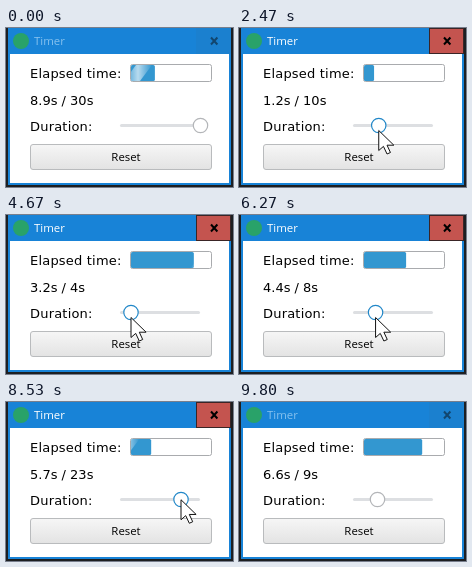
Animation of 227 by 159 pixels, one loop 9.87 s. Source, as an HTML page:

```html
<!DOCTYPE html>
<html lang="en">
<head>
<meta charset="utf-8">
<title>Timer</title>
<style>
  html, body { margin: 0; width: 100%; height: 100%; overflow: hidden; background: #1d1f22; }
  svg { display: block; width: 227px; height: 159px; }
  .label { font: 13px "DejaVu Sans", Verdana, sans-serif; }
  .wide { letter-spacing: .2px; }
  .ui { font: 11.4px "Open Sans", "Noto Sans", sans-serif; }
</style>
</head>
<body>
<svg viewBox="0 0 227 159">
  <defs>
    <linearGradient id="face" x2="0" y2="1">
      <stop stop-color="#f6f6f6"/><stop offset="1" stop-color="#e3e3e3"/>
    </linearGradient>
    <linearGradient id="glow">
      <stop stop-color="#fff" stop-opacity="0"/>
      <stop offset=".5" stop-color="#fff" stop-opacity=".65"/>
      <stop offset="1" stop-color="#fff" stop-opacity="0"/>
    </linearGradient>
    <clipPath id="filled"><rect id="clip" x="125" y="37" height="16" rx="1.5"/></clipPath>
  </defs>

  <rect x="2" width="223" height="157" fill="#1883d7"/>
  <rect x="4" y="26" width="219" height="129" fill="#fff"/>
  <circle cx="15" cy="13" r="8" fill="#29a269"/>
  <text id="title" class="ui" x="28" y="17">Timer</text>
  <rect id="close" x="190.5" y=".5" width="34" height="25"/>
  <path id="cross" d="M205 9.5l6.4 7m0-7l-6.4 7" stroke-width="2" fill="none"/>

  <text class="label wide" x="24" y="50">Elapsed time:</text>
  <text id="status" class="label" x="24" y="77"></text>
  <text class="label wide" x="24" y="103">Duration:</text>

  <rect x="124.5" y="36.5" width="81" height="17" rx="2" fill="#fff" stroke="#a9abae"/>
  <g clip-path="url(#filled)">
    <rect x="125" y="37" width="80" height="16" fill="#3397d0"/>
    <path id="sheen" d="M-9 53L3 37H19L7 53Z" fill="url(#glow)"/>
  </g>

  <rect x="114" y="96" width="80" height="3" rx="1.5" fill="#dddfe2"/>
  <circle id="knob" cy="97.5" r="7.2" fill="#fff" stroke-width="1.2"/>

  <rect id="button" x="24.5" y="116.5" width="181" height="25" rx="2.5"/>
  <text class="ui" x="120" y="133" text-anchor="middle" textLength="">Reset</text>

  <path id="cursor" d="M.5 .5V20.5L5.2 16.4L8.8 24L12.2 22.5L8.8 15.2H15.6Z"
        fill="#fff" stroke="#111" stroke-linejoin="round"/>
</svg>
<script>
const LOOP = 9870, FPS = 15;
const DRAG_START = 1500, DRAG_END = 9200;
const $ = id => document.getElementById(id);
const set = (id, attrs) => {
  for (const key in attrs) $(id).setAttribute(key, attrs[key]);
};

// start and end time of each pointer move, and where it leads
const moves = [
  [130, 700, 182, 128], [1070, 1330, 190, 102], [DRAG_START, 2900, 124.5, 102],
  [6000, 6530, 147, 102], [6900, 7530, 143, 101], [7530, 8200, 187, 97],
  [8200, DRAG_END, 138, 98], [9250, 9600, 152, 164]
];

function pointer(t) {
  let x = 215, y = 164;
  for (const [from, to, tx, ty] of moves) {
    const p = Math.min(1, Math.max(0, (t - from) / (to - from)));
    const ease = p * p * (3 - 2 * p);
    x += (tx - x) * ease;
    y += (ty - y) * ease;
  }
  return { x, y };
}

// two ticks of a tenth in every 200 ms
const ticks = ms => (2 * Math.floor(ms / 200) + (ms % 200 >= 60)) / 10;

// dragging slows the clock; it rests once the duration is reached
function elapsed(t) {
  if (t < 870) return 8.9 + t * .0008;
  if (t < 3070) return (t - 770) * .00072;
  if (t < 6070) return 1.6 + ticks(Math.min(t, 5530) - 3070);
  if (t < 6930) return 4.2 + ticks(t - 6070);
  const s = (t - 6930) / 1000;
  return 5.1 + .28 * s + .09 * s * s;
}

function draw(t) {
  const active = t >= 870 && t < 9700;
  const dragging = t >= DRAG_START && t < DRAG_END;
  const { x, y } = pointer(t);
  const knob = t < DRAG_START ? 194.5 : pointer(Math.min(t, DRAG_END)).x + .5;
  const total = (knob - 114) * 30 / 81;
  const time = Math.floor(elapsed(t) * 10 + 1e-6) / 10;

  set("title", { fill: active ? "#fff" : "#86c1ee" });
  set("close", {
    fill: active ? "#c4544f" : "#1b80cf",
    stroke: active ? "#3a2526" : "#1b80cf"
  });
  set("cross", { stroke: active ? "#000" : "#12466f" });

  $("status").textContent = `${time.toFixed(1)}s / ${Math.round(total)}s`;
  set("clip", { width: 80 * Math.min(1, time / total) });
  set("sheen", { transform: `translate(${109 + (t + 100) % 2150 * .18} 0)` });

  set("knob", { cx: knob, stroke: dragging ? "#2187c8" : "#b3b5b8" });
  const focused = t >= 730 && t < DRAG_START;
  set("button", { fill: "url(#face)", stroke: focused ? "#3a92cc" : "#b9bbbd" });
  set("cursor", {
    visibility: t >= 130 && t < 9600 ? "visible" : "hidden",
    transform: `translate(${x} ${y})`
  });
}

const origin = performance.now();
function frame() {
  const t = Math.max(0, performance.now() - origin) % LOOP;
  const step = Math.floor((t + 4) * FPS / 1000) % 148;
  draw(Math.round(step * 100 / FPS) * 10);
  requestAnimationFrame(frame);
}
frame();
</script>
</body>
</html>
```
